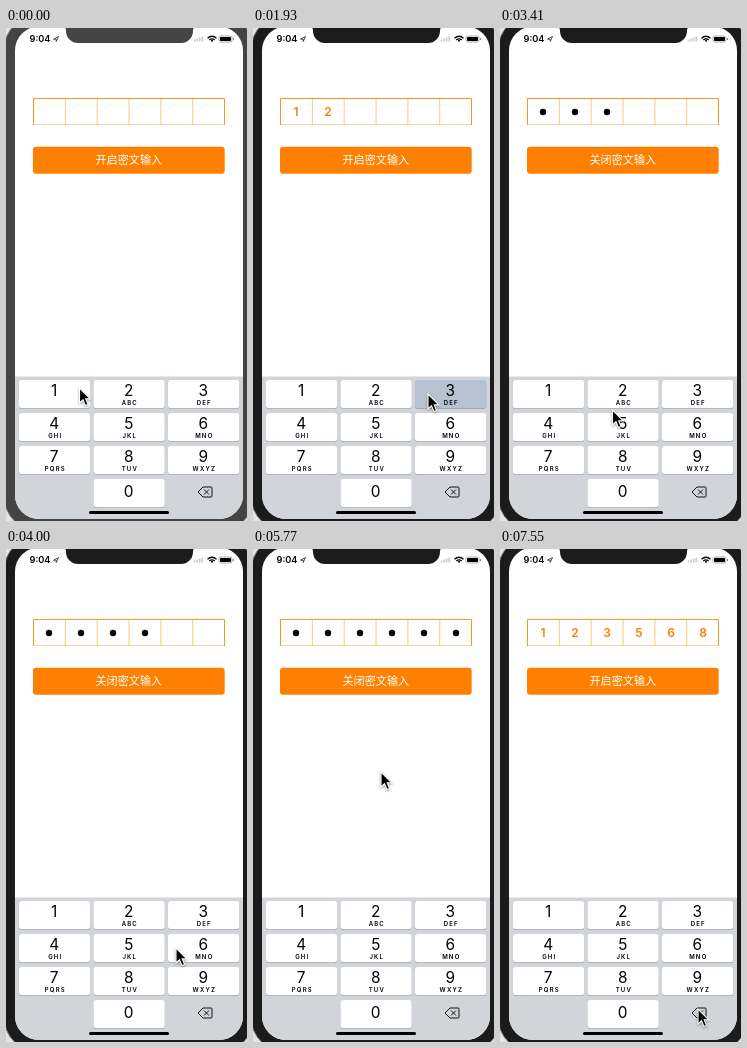
Recreate the animation shown at these times as an HTML page. Size 241 by 493 pixels, loop 8 s.

```html
<!DOCTYPE html>
<html lang="zh">
<head>
<meta charset="utf-8">
<style>
  html, body { margin: 0; width: 100%; height: 100%; overflow: hidden; background: #e4e4e4; }
  svg { display: block; width: 241px; height: 493px; }
  text { font-family: Inter, Roboto, sans-serif; text-anchor: middle; }
  .label { font: 300 11.1px "Noto Sans CJK SC", "Noto Sans CJK", sans-serif; fill: #fff; }
  .num { font-size: 15.4px; }
  .sub { font-size: 6px; font-weight: 600; letter-spacing: 1.2px; }
  .digit { font-size: 12px; font-weight: 600; fill: #ff8000; }
  .line { fill: none; stroke: #ff9420; }
</style>
</head>
<body>
<svg viewBox="0 0 241 493">
  <rect class="bezel" x="-2" y="-13" width="250" height="516" rx="35" stroke="#777"/>
  <clipPath id="screen"><rect x="9" y="-1.5" width="228" height="492.5" rx="24"/></clipPath>
  <g clip-path="url(#screen)">
    <rect width="241" height="493" fill="#fff"/>
    <rect y="348.5" width="241" height="145" fill="#d1d5da"/>
    <g id="keys"></g>
    <path d="M197 459H205Q206 459 206 460V468Q206 469 205 469H197L192 464ZM198 461.5l5 5m0-5l-5 5" fill="none" stroke="#111" stroke-linejoin="round"/>
    <rect x="83" y="483" width="80" height="3" rx="1.5"/>
  </g>
  <path class="bezel" d="M55 -2Q60 -2 60 3A12 12 0 0 0 72 15H175A12 12 0 0 0 187 3Q187 -2 192 -2Z"/>
  <text x="34" y="14" font-size="9.2" font-weight="600">9:04</text>
  <path d="M47.5 11.2L52.5 8.5L50.2 13.5V11.2Z" fill="none" stroke="#222" stroke-width=".8"/>
  <path d="M188.5 13.5v-2m2.6 2v-3m2.6 3v-4m2.6 4v-5" stroke="#ccc" stroke-width="1.7"/>
  <path d="M201.5 10.2Q206 6.3 210.5 10.2M203.3 12Q206 9.7 208.7 12" fill="none" stroke="#000" stroke-width="1.3"/>
  <circle cx="206" cy="12.8" r="1"/>
  <rect x="213" y="8" width="13" height="6" rx="1.7" fill="none" stroke="#888" stroke-width=".7"/>
  <rect x="214" y="9" width="11" height="4" rx=".8"/>
  <path d="M227.500 10v2" stroke="#888"/>
  <path class="line" d="M27.5 96.500H218.500" opacity=".4"/>
  <g id="cells"></g>
  <path class="line" d="M27.500 97V70.500H218.500V97"/>
  <rect x="27" y="118.700" width="191.700" height="27" rx="3" fill="#ff8000"/>
  <text id="label" class="label" x="122.800" y="136"></text>
  <path id="cursor" d="M0 0V15L3.500 11.800L6 17.600L8.600 16.500L6.200 10.900H10.800Z" stroke="#fff" stroke-width="1.100" style="filter:drop-shadow(0 1px 1px #0006)"/>
</svg>
<script>
const $ = id => document.getElementById(id);
const LOOP = 8000, STEP = 148, LAST = 51, MOVE = 3;
const HIDE = 19, REVEAL = 48;
const letters = ['', '', 'ABC', 'DEF', 'GHI', 'JKL', 'MNO', 'PQRS', 'TUV', 'WXYZ'];

// Typed digit: step it appears, digit, steps its key stays lit before that
const taps = [[2, 1, 1], [7, 2, 1], [14, 3, 2], [25, 5, 1], [29, 6, 0], [35, 8, 1]];

// Pointer stops: arrival step, x, y
const stops = [
  [0, 73.5, 360], [5, 97, 362], [10, 155, 363], [13, 175, 366], [17, 118, 131],
  [23, 112.5, 382], [27, 170, 399], [33, 119, 427], [36, 116, 456], [39, 128, 223],
  [42, 186, 80], [46, 130, 131], [50, 211, 452], [51, 198, 460]
];

function keyMarkup(n) {
  const i = n ? n - 1 : 10;
  const x = 13 + i % 3 * 74.5, y = 352 + Math.floor(i / 3) * 33;
  const box = (dy, extra) =>
    `<rect x="${x}" y="${y + dy}" width="71.2" height="28.2" rx="3" ${extra}/>`;
  return box(0.8, 'fill="#9a9da2"') + box(0, `id="key${n}"`) +
    `<text class="num" x="${x + 35.2}" y="${y + (n ? 16 : 18)}">${n}</text>` +
    `<text class="sub" x="${x + 36.3}" y="${y + 24.5}">${letters[n]}</text>`;
}

function cellMarkup([, digit], i) {
  const x = 43 + i * 32, edge = 27.5 + i * 31.85;
  return `<path class="line" d="M${edge} 70V97" opacity=".55"/>` +
    `<text class="digit" x="${x}" y="88.2">${digit}</text>` +
    `<circle cx="${x}" cy="84" r="3.2"/>`;
}

$('keys').innerHTML = letters.map((_, n) => keyMarkup(n)).join('');
$('cells').innerHTML = taps.map(cellMarkup).join('');
const digits = document.querySelectorAll('.digit');
const dots = document.querySelectorAll('#cells circle');
const bezels = document.querySelectorAll('.bezel');

// Rest at each stop, then ease to the next within MOVE steps of its arrival
function pointerAt(s) {
  const i = Math.max(1, stops.findIndex(p => p[0] >= s));
  const [s0, x0, y0] = stops[i - 1], [s1, x1, y1] = stops[i];
  const from = Math.max(s0, s1 - MOVE);
  const u = Math.max(0, (s - from) / (s1 - from)), e = u * u * (3 - 2 * u);
  return [x0 + (x1 - x0) * e, y0 + (y1 - y0) * e];
}

function draw(now) {
  const s = Math.min(LAST, Math.floor((now % LOOP + 16) / STEP));
  const secure = s >= HIDE && s < REVEAL;
  bezels.forEach(b => b.setAttribute('fill', s ? '#1b1b1b' : '#444'));
  taps.forEach(([at, digit, hold], i) => {
    const lit = s < at && s >= at - hold;
    $('key' + digit).setAttribute('fill', lit ? '#b6c2d0' : '#fff');
    digits[i].style.display = s >= at && !secure ? '' : 'none';
    dots[i].style.display = s >= at && secure ? '' : 'none';
  });
  $('label').textContent = (secure ? '关闭' : '开启') + '密文输入';
  $('cursor').setAttribute('transform', `translate(${pointerAt(s)})`);
}

letters.forEach((_, n) => $('key' + n).setAttribute('fill', '#fff'));
const start = performance.now();
function tick() {
  draw(performance.now() - start);
  requestAnimationFrame(tick);
}
tick();
</script>
</body>
</html>
```
